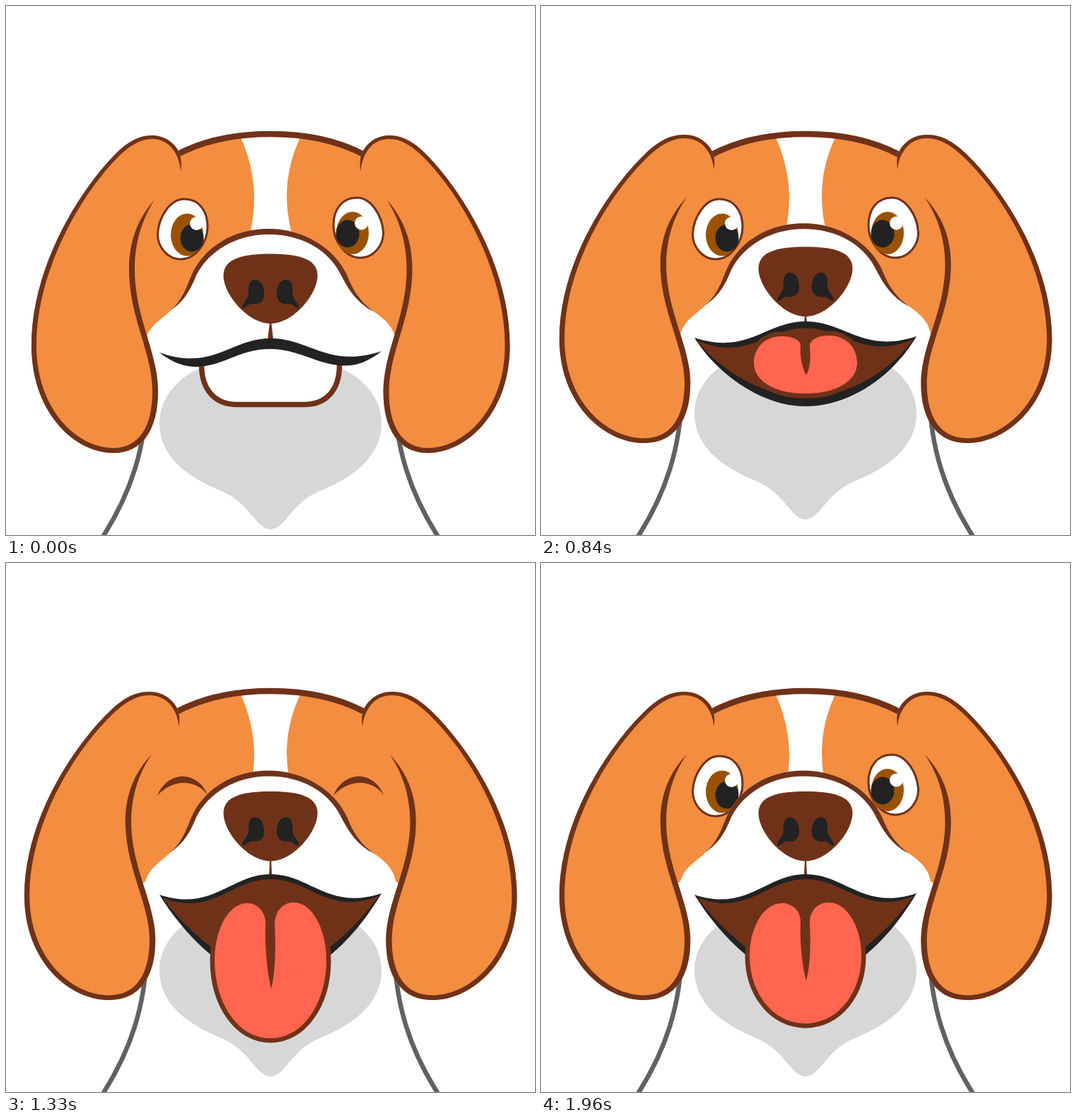
Animation of 748 by 748 pixels, one loop 2.1 s. Source, as an HTML page:

```html
<!DOCTYPE html>
<html lang="en">
<head>
<meta charset="utf-8">
<title>Panting dog</title>
<style>
  html, body { margin: 0; width: 100%; height: 100%; overflow: hidden; background: #fff; }
  svg { display: block; width: 100%; height: 100%; }
  .brown { fill: #6f3219; }
  .orange { fill: #f38d3f; }
  .black { fill: #222; }
  .white { fill: #fff; }
  .line { fill: none; stroke: #6f3219; }
</style>
</head>
<body>
<svg viewBox="0 0 748 748">
  <defs>
    <g id="ear">
      <path id="earFill" class="orange"/>
      <path id="earEdge" class="brown"/>
    </g>
    <path id="nostril" class="black" d="M352 387C361 387 366 398 365 410C363 421 355 422 347 421C342 422 338 428 334 427C333 420 343 416 343 405C342 394 345 387 352 387Z"/>
    <path id="neck" fill="none" stroke="#606163" stroke-width="6.5" d="M199 545C198 625 176 690 136 752"/>
    <path id="lid" class="brown" d="M214 329C228 294 270 292 285 328C268 305 236 305 214 329Z"/>
    <path id="eyeball" class="white" stroke="#6f3219" stroke-width="3" d="M252 273C273 273 285 290 285 312C285 335 268 358 247 358C228 358 214 340 214.500 322C216 298 232 273 252 273Z"/>
  </defs>

  <path class="orange" d="M242 210C285 187 330 181 374 181C418 181 463 187 506 210L563 270L593 350L583 470H165L155 350L185 270Z"/>
  <path class="white" d="M331 184C352 230 356 275 345 322H404C392 275 395 230 417 184Z"/>
  <path class="line" stroke-width="8.500" d="M242 210C285 187 330 181 374 181C418 181 463 187 506 210"/>

  <g id="open">
    <use href="#eyeball"/>
    <ellipse cx="256" cy="323.500" rx="23" ry="30" fill="#9a5200"/>
    <ellipse class="black" cx="263" cy="328" rx="16.500" ry="19.500"/>
    <circle class="white" cx="269.500" cy="307.500" r="9.500"/>
    <use href="#eyeball" transform="translate(748 -2) scale(-1 1)"/>
    <ellipse cx="490" cy="321" rx="23" ry="30" fill="#9a5200"/>
    <ellipse class="black" cx="483" cy="322" rx="16.500" ry="19.500"/>
    <circle class="white" cx="502.500" cy="307" r="9.500"/>
  </g>
  <g id="shut">
    <use href="#lid"/>
    <use href="#lid" x="249"/>
  </g>

  <g id="muzzle">
    <path class="white" d="M150 500L197 472C203 450 225 440 232 431C250 415 255 397 262 381C280 340 322 315 371 315C422 315 465 343 482 380C490 400 500 418 520 432C528 438 548 450 551 472L600 500V520H150Z"/>
    <path class="brown" d="M232 431C250 415 255 397 262 381C280 340 322 315 371 315C422 315 465 343 482 380C490 400 500 418 520 432C496 421 483 398 475 383C458 346 420 323 371 323C325 323 286 347 269 381C260 403 252 417 232 431Z"/>
  </g>

  <use href="#neck"/>
  <use href="#neck" transform="translate(748) scale(-1 1)"/>
  <path id="chest" fill="#d7d7d7" d="M217 590C217 640 262 668 300 684C330 696 340 712 350 723C358 733 366 740 374 740C382 740 390 733 398 723C408 712 418 696 448 684C486 668 531 640 531 590C531 552 502 524 473 512H275C246 524 217 552 217 590Z"/>

  <path id="philtrum" class="brown"/>
  <g id="closedMouth">
    <path class="white" stroke="#6f3219" stroke-width="7.500" d="M276.500 506C276 545 298 563.500 326 563.500H422C451 563.500 472 545 471.500 506"/>
    <path class="black" d="M217 490C292 517 318 470 374 470C430 470 456 513 531 488C505 509 480 513 450 504C425 497 403 485 374 485C350 485 335 491 310 501C285 510 255 520 217 490Z"/>
  </g>
  <g id="openMouth">
    <path id="lips" class="black"/>
    <path id="inside" class="brown"/>
    <path id="tongue" fill="#ff654f" stroke="#6f3219" stroke-width="13" stroke-linejoin="round" paint-order="stroke"/>
  </g>

  <g id="nose">
    <path class="brown" d="M307.500 381C307.500 356 338 350.500 374 350.500C410 350.500 440.500 356 440.500 381C440.500 408 406 449 374 449C342 449 307.500 408 307.500 381Z"/>
    <use href="#nostril"/>
    <use href="#nostril" transform="translate(748) scale(-1 1)"/>
  </g>

  <use href="#ear"/>
  <use href="#ear" transform="translate(748.500) scale(-1 1)"/>
</svg>
<script>
const LOOP = 2100, STEP = 70, LAST = 1960;
const OPENING = 840, OPENED = 980, PANT = 560;
const el = id => document.getElementById(id);
const mix = (a, b, u) => a + (b - a) * u;
const clamp = u => Math.min(1, Math.max(0, u));
const show = (id, on) => el(id).setAttribute('visibility', on ? 'visible' : 'hidden');
const path = (id, d) => el(id).setAttribute('d', d);
const shift = (id, dy) => el(id).setAttribute('transform', `translate(0 ${dy})`);

const earOuter = 'M247 234C250 215 245 203 235 194C228 187 217 183 207 183C184 183 168 196 153 211C98 268 36 374 36 480C36 575 97 632 152 632C192 632 215 600 215 545C215 490 182 440 182 372C182 335 192 302 210 274';
const earInner = 'C185 302 174 335 174 372C174 440 207 490 207 545C207 595 188 625 152 625C100 625 43 570 43 480C43 377 103 270 157 215C172 200 188 188 207 188C217 188 226 192 232 198C240 206 246 218 247 234Z';
path('earFill', earOuter + 'Z');
path('earEdge', earOuter + earInner);

// time, x scale, y scale, x offset, y offset
const earKeys = [
  [350, 1, 1, 0, 0],
  [420, 1.016, 0.983, -3.6, 0],
  [630, 1.106, 0.932, -30, 5.5],
  [840, 1.035, 0.971, -11.3, 4.4]
];

function poseEars(t) {
  const next = earKeys.findIndex(k => k[0] >= t);
  const n = next < 0 ? earKeys.length - 1 : Math.max(1, next);
  const a = earKeys[n - 1], b = earKeys[n];
  const u = clamp((t - a[0]) / (b[0] - a[0]));
  const [sx, sy, x, y] = [1, 2, 3, 4].map(j => mix(a[j], b[j], u));
  el('ear').setAttribute('transform', `matrix(${sx} 0 0 ${sy} ${x} ${y})`);
}

function poseMouth(k) {
  const top = mix(446, 440, (k - 0.36) / 0.64);
  const low = mix(566, 590, (k - 0.36) / 0.64);
  const lip = 11 - 4 * k;
  const arch = (y, side) => `C292 ${side} 318 ${y} 374 ${y}C430 ${y} 456 ${side - 2}`;
  path('lips', `M217 469${arch(top, 494)} 531 467C500 520 440 ${low} 374 ${low}C308 ${low} 245 515 217 469Z`);
  path('inside', `M221 473${arch(top + lip, 494 + lip)} 527 471
    C495 515 435 ${low - 13} 374 ${low - 13}C313 ${low - 13} 250 512 221 473Z`);
}

function poseTongue(out, pant) {
  const left = mix(301, 295, out), right = mix(447, 453, out);
  const top = mix(467, 481, out);
  const side = mix(505, 548 + 16 * pant, out);
  const tip = mix(548, 626 + 55 * pant, out);
  const notch = mix(522, 576 + 31 * pant, out);
  const neck = mix(top, notch, 0.26), taper = mix(top, notch, 0.77);
  const rise = mix(side, top, 0.54), fall = mix(side, tip, 0.55);
  path('tongue', `M375 ${notch}C368 ${taper} 366 ${mix(neck, notch, 0.25)} 367 ${neck}
    C368 ${mix(neck, top, 0.6)} 356 ${top} 341 ${top}C315 ${top} ${left} ${rise} ${left} ${side}
    C${left} ${fall} 328 ${tip} 374 ${tip}C420 ${tip} ${right} ${fall} ${right} ${side}
    C${right} ${rise} 433 ${top - 1} 407 ${top - 1}C390 ${top - 1} 380 ${mix(neck, top, 0.6)} 380 ${neck}
    C381 ${mix(neck, notch, 0.25)} 382 ${taper} 375 ${notch}Z`);
}

function draw(t) {
  const isOpen = t >= OPENING;
  const lift = isOpen ? mix(0.36, 1, clamp((t - OPENING) / (OPENED - OPENING))) : 0;
  const noseY = -27.5 * lift;
  const swing = (1 - Math.cos(2 * Math.PI * (t - OPENED) / PANT)) / 2;
  const pant = t > OPENED ? swing ** 1.13 : 0;
  const blink = t >= 1050 && t < 1470;

  poseEars(t);
  shift('muzzle', -21.5 * lift);
  shift('nose', noseY);
  shift('chest', isOpen ? -14 : 0);
  show('open', !blink);
  show('shut', blink);
  show('closedMouth', !isOpen);
  show('openMouth', isOpen);

  const lipY = isOpen ? mix(449.5, 440, lift) + 2 : 472;
  const half = isOpen ? 2 : 4;
  path('philtrum', `M373 ${446 + noseY}H375L${374 + half} ${lipY}H${374 - half}Z`);
  if (isOpen) {
    poseMouth(lift);
    poseTongue((lift - 0.36) / 0.64, pant);
  }
}

function tick() {
  const t = performance.now() % LOOP;
  draw(Math.min(LAST, Math.floor(t / STEP) * STEP));
  requestAnimationFrame(tick);
}
tick();
</script>
</body>
</html>
```
